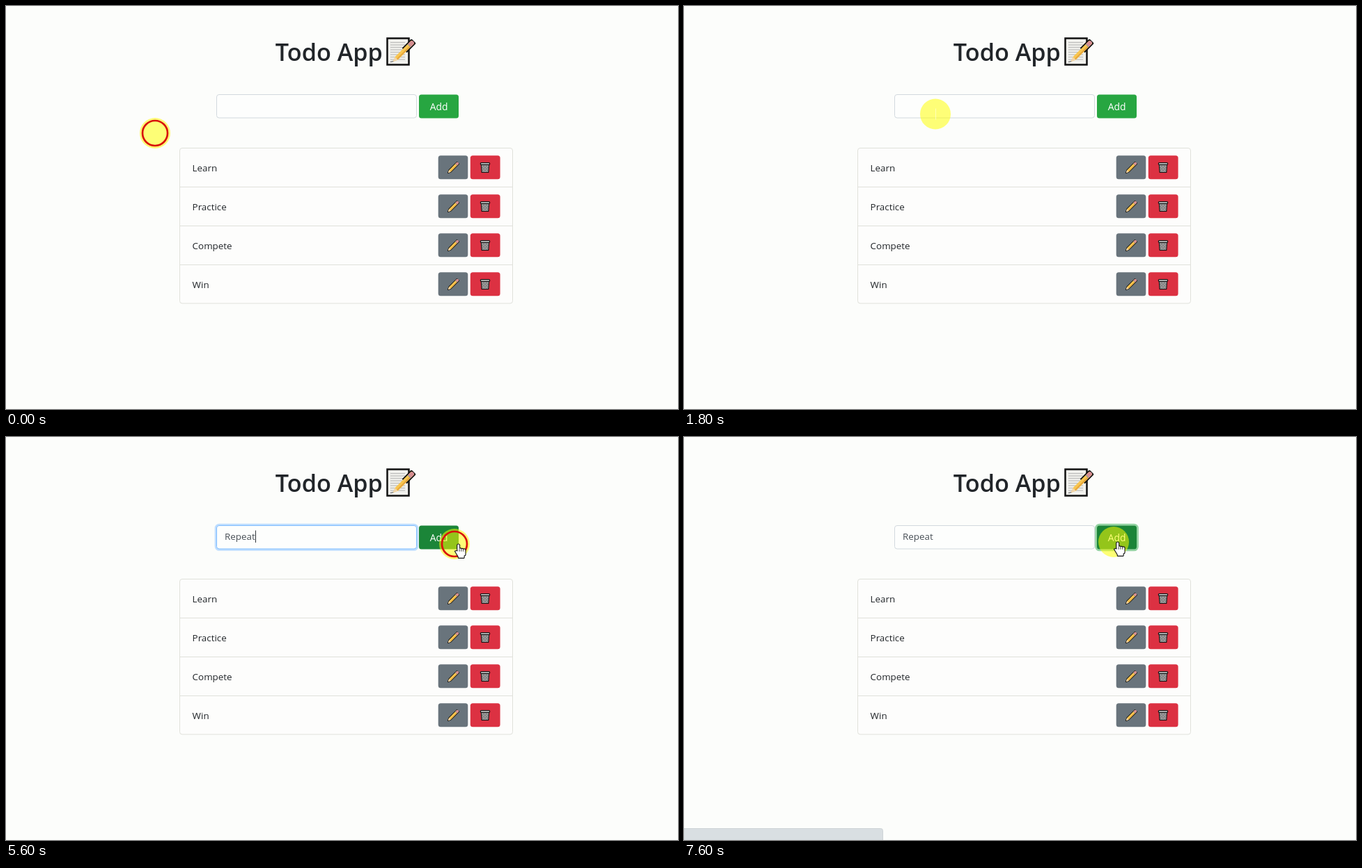
Write an HTML page with a canvas that moves like this. It is 965 px wide and 580 px high and loops after 8 s.

```html
<!DOCTYPE html>
<html lang="en">
<head>
<meta charset="utf-8">
<title>Todo App</title>
<style>
  html, body { margin: 0; width: 100%; height: 100%; overflow: hidden; background: #fcfdfb; }
  canvas { display: block; }
</style>
</head>
<body>
<canvas id="stage" width="965" height="580"></canvas>
<script>
const ctx = document.getElementById('stage').getContext('2d');
const LOOP = 8000, STEP = 200;
const FONT = '"Open Sans", "Noto Sans", sans-serif';
const ITEMS = ['Learn', 'Practice', 'Compete', 'Win'];
const WORD = 'Repeat';
const INK = '#111', RULE = '#e0e1db';
const BUTTON = { x: 593, y: 127.5, w: 57, h: 34 };
const FIELD = { x: 302.5, y: 127.5, w: 287, h: 33.5 };
const CLICKS = [0, 2400, 5600];

const clamp = (v, lo, hi) => Math.min(hi, Math.max(lo, v));
const inside = (p, r) => p.x > r.x && p.x < r.x + r.w && p.y > r.y && p.y < r.y + r.h;

// Eased progress from 0 to 1 between two times
const ease = (t, from, to, power = 2) => 1 - (1 - clamp((t - from) / (to - from), 0, 1)) ** power;

// Resting points: start, field, button edge, button
function pointerAt(t) {
  const toField = ease(t, 0, 1200, 2.8), lift = ease(t, 0, 1200, 1.7);
  const toButton = ease(t, 4400, 5400), settle = ease(t, 5800, 6600);
  return {
    x: 214 + 147 * toField + 283 * toButton - 27 * settle,
    y: 183 - 27.5 * lift - 1.5 * toButton - 3 * settle
  };
}

// One letter per step, with one pause after the second
function typedAt(t) {
  const pause = t >= 3600 ? STEP : 0;
  return WORD.slice(0, clamp((t - 3000 - pause) / STEP, 0, WORD.length));
}

function paint(path, fill, stroke, lw = 1) {
  if (fill) { ctx.fillStyle = fill; ctx.fill(path); }
  if (stroke) { ctx.strokeStyle = stroke; ctx.lineWidth = lw; ctx.stroke(path); }
}

// Outline first, so that overlapping parts merge into one shape
function outlined(path) {
  paint(path, null, INK, 2.2);
  paint(path, '#fff');
}

function box(x, y, w, h, r, fill, stroke, lw) {
  const path = new Path2D();
  path.roundRect(x, y, w, h, r);
  paint(path, fill, stroke, lw);
}

function disc(x, y, r, fill, stroke, lw) {
  const path = new Path2D();
  path.arc(x, y, r, 0, 2 * Math.PI);
  paint(path, fill, stroke, lw);
}

function line(x0, y0, x1, y1, color, lw = 1) {
  paint(new Path2D(`M${x0} ${y0}L${x1} ${y1}`), null, color, lw);
}

function label(text, x, y, size, color, weight = 400) {
  ctx.font = `${weight} ${size}px ${FONT}`;
  ctx.fillStyle = color;
  ctx.fillText(text, x, y);
}

function at(x, y, angle, draw) {
  ctx.save();
  ctx.translate(x, y);
  ctx.rotate(angle);
  ctx.lineJoin = 'round';
  draw();
  ctx.restore();
}

// Tip at (x, y), pointing down left; the outline begins at a share of the length
function pencil(x, y, length, width, outlineFrom, lw) {
  at(x, y, -Math.PI / 4, () => {
    const h = width / 2, cone = width * 1.1, band = length * .8;
    const body = new Path2D(`M0 0L${cone} ${-h}H${length - 1}V${h}H${cone}Z`);
    ctx.save();
    ctx.beginPath();
    ctx.rect(length * outlineFrom - lw, -width, length * 2, width * 2);
    ctx.clip();
    paint(body, null, INK, lw * 2);
    ctx.restore();
    paint(body, '#f8c650');
    paint(new Path2D(`M0 0L${cone} ${-h}V${h}Z`), '#f0d5ac');
    line(cone, h * .5, band, h * .5, '#e5a23a', h * .5);
    box(band, -h, length - band, width, [0, h, h, 0], '#d48d92');
    line(band, -h, band, h, '#a49b96', h * .5);
  });
}

function memo() {
  box(547.5, 46.5, 31, 38, 0, '#f1f1ed', INK, 2.5);
  for (let y = 52.5; y < 80; y += 3.5) line(552, y, 573, y, '#bcbcbb', 1.2);
  line(552, 80.5, 557, 79.5, '#555');
  pencil(556, 80, 41, 6, .6, 1.8);
}

function bin(x, y) {
  at(x, y, 0, () => {
    const body = new Path2D('M-5.7 -5H5.7L4.8 7H-4.8Z');
    paint(body, '#a2a2a2', INK, 1.2);
    ctx.save();
    ctx.clip(body);
    for (let i = -16; i <= 16; i += 4) {
      line(i - 6, -6, i + 6, 6, '#666', .7);
      line(i + 6, -6, i - 6, 6, '#666', .7);
    }
    ctx.restore();
    box(-6.7, -7, 13.4, 3, 1.5, '#aaa', INK, 1.2);
  });
}

function glow(r, color) {
  box(r.x - 1.3, r.y - 1.3, r.w + 2.6, r.h + 2.6, 5, null, color, 3);
}

function form(t, hover) {
  const focused = t >= 2600 && t < 5800;
  const pressed = t >= 5800;
  if (focused) glow(FIELD, '#bfdeff');
  box(FIELD.x, FIELD.y, FIELD.w, FIELD.h, 3.5, '#fdfefd', focused ? '#80bdff' : '#d2d9de');

  const text = typedAt(t);
  label(text, 314, 148.4, 13.4, '#495057');
  if (focused && t >= 3000) {
    const x = Math.round(314 + ctx.measureText(text).width) + .5;
    line(x, 134.5, x, 152, '#30363b');
  }

  if (pressed) glow(BUTTON, '#94d3a2');
  box(BUTTON.x, BUTTON.y, BUTTON.w, BUTTON.h, 3.5, hover || pressed ? '#1b8538' : '#27a641');
  label('Add', 608.8, 149.8, 13.9, '#fff');
}

function list() {
  box(249.5, 204.5, 478, 223.5, 3.5, '#fdfdfc', RULE);
  ITEMS.forEach((name, i) => {
    const y = 204.5 + i * 56;
    if (i) line(249.5, y, 727.5, y, RULE);
    label(name, 267.6, y + 33.3, 13.4, '#212529');
    box(620.7, y + 10.8, 42.6, 34, 3.5, '#69747c');
    box(666.8, y + 10.8, 42.8, 34, 3.5, '#dc3142');
    pencil(634.7, y + 35.7, 21, 3.6, 0, .8);
    bin(688, y + 28);
  });
}

function arrow(x, y) {
  at(x, y, 0, () => {
    const path = new Path2D('M0 .5V13.5L3.6 10.4H9.3Z');
    path.addPath(new Path2D('M2.7 9L5.6 16L7.3 15.3L4.4 8.3Z'));
    outlined(path);
  });
}

function hand(x, y) {
  at(x, y, 0, () => {
    const path = new Path2D();
    for (let i = 0; i < 4; i++) {
      path.roundRect(-1.5 + i * 2.8, i ? 5.6 + i * .5 : .3, 2.8, 9, 1.4);
    }
    path.roundRect(-1.5, 8, 11.2, 8, 2);
    path.rect(0, 14, 7.8, 5.5);
    path.addPath(new Path2D('M-4.7 10.2L-2.6 9.8L0 12V18Z'));
    outlined(path);
    for (let i = 1; i < 4; i++) line(-1.5 + i * 2.8, 7, -1.5 + i * 2.8, 10.5, INK, .8);
  });
}

function pointer(t, p, hover) {
  disc(p.x, p.y, 22, 'rgba(255, 255, 0, .53)');
  if (CLICKS.includes(t)) disc(p.x, p.y, 18, null, '#d9120c', 2.7);

  if (hover) hand(p.x + 5.8, p.y + .3);
  else if (inside(p, FIELD)) line(p.x + .5, p.y - 8, p.x + .5, p.y + 8, 'rgba(255, 255, 225, .6)');
  else if (t > 0) arrow(p.x - .7, p.y - .7);
}

function render(t) {
  const p = pointerAt(t);
  const hover = inside(p, BUTTON);
  ctx.fillStyle = '#fcfdfb';
  ctx.fillRect(0, 0, 965, 580);
  label('Todo App', 386.8, 78.8, 34.2, '#212529', 600);
  memo();
  form(t, hover);
  list();
  if (t >= 7000) box(-1, 563.5, 286.5, 18, [0, 3, 0, 0], '#d9dfe2', '#cdd3d6');
  pointer(t, p, hover);
}

const start = performance.now();
function tick() {
  const t = (performance.now() - start) % LOOP;
  render(Math.floor(t / STEP) * STEP);
  requestAnimationFrame(tick);
}
tick();
</script>
</body>
</html>
```
